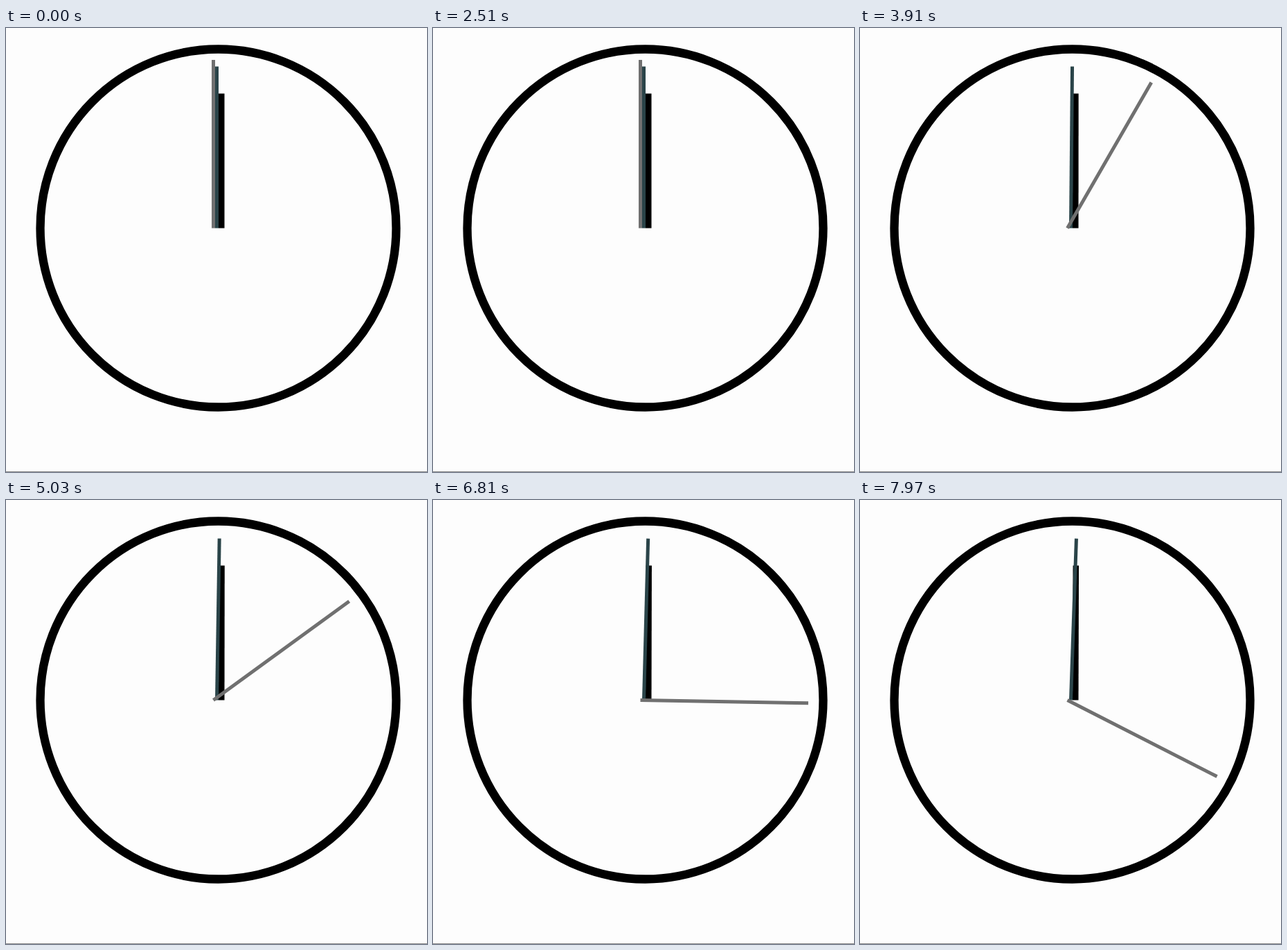
These frames come from a looping animation (608x640 px, 8 s). An HTML page:

```html
<!DOCTYPE html>
<html lang="en">
<head>
<meta charset="utf-8">
<title>Clock</title>
<style>
  html, body { margin: 0; width: 100%; height: 100%; overflow: hidden; background: #fdfdfd; }
  svg { display: block; width: 608px; height: 640px; }
</style>
</head>
<body>
<svg viewBox="0 0 608 640">
  <ellipse cx="306.5" cy="288.5" rx="257" ry="258" fill="none" stroke="#000" stroke-width="12.3"/>
  <rect y="639" width="608" height="1" fill="#8a8a8a"/>
  <rect id="hour" x="307" y="94.5" width="8.5" height="194" fill="#000"/>
  <rect id="minute" x="302" y="55.5" width="5" height="233" fill="#2a4449"/>
  <rect id="second" x="297" y="46" width="5" height="242.5" fill="#707070"/>
</svg>
<script>
  const LOOP = 8000, START = 2510, BEAT = 140;
  const hands = [
    { id: 'hour', x: 311.25, ratio: 1 / 720 },
    { id: 'minute', x: 304.5, ratio: 1 / 60 },
    { id: 'second', x: 299.5, ratio: 1 }
  ].map(hand => ({ ...hand, node: document.getElementById(hand.id) }));

  // Each beat advances three degrees: a long hold, then two quick ticks.
  function degreesAt(time) {
    const elapsed = time - START;
    if (elapsed < 0) return 0;
    const rest = elapsed % BEAT;
    return 3 * Math.floor(elapsed / BEAT) + (rest >= 100) + (rest >= 120);
  }

  function draw(now) {
    const degrees = degreesAt(now % LOOP);
    for (const { node, x, ratio } of hands) {
      node.setAttribute('transform', `rotate(${degrees * ratio} ${x} 288.5)`);
    }
  }

  const origin = performance.now();
  function tick() {
    draw(performance.now() - origin);
    requestAnimationFrame(tick);
  }
  tick();
</script>
</body>
</html>
```
